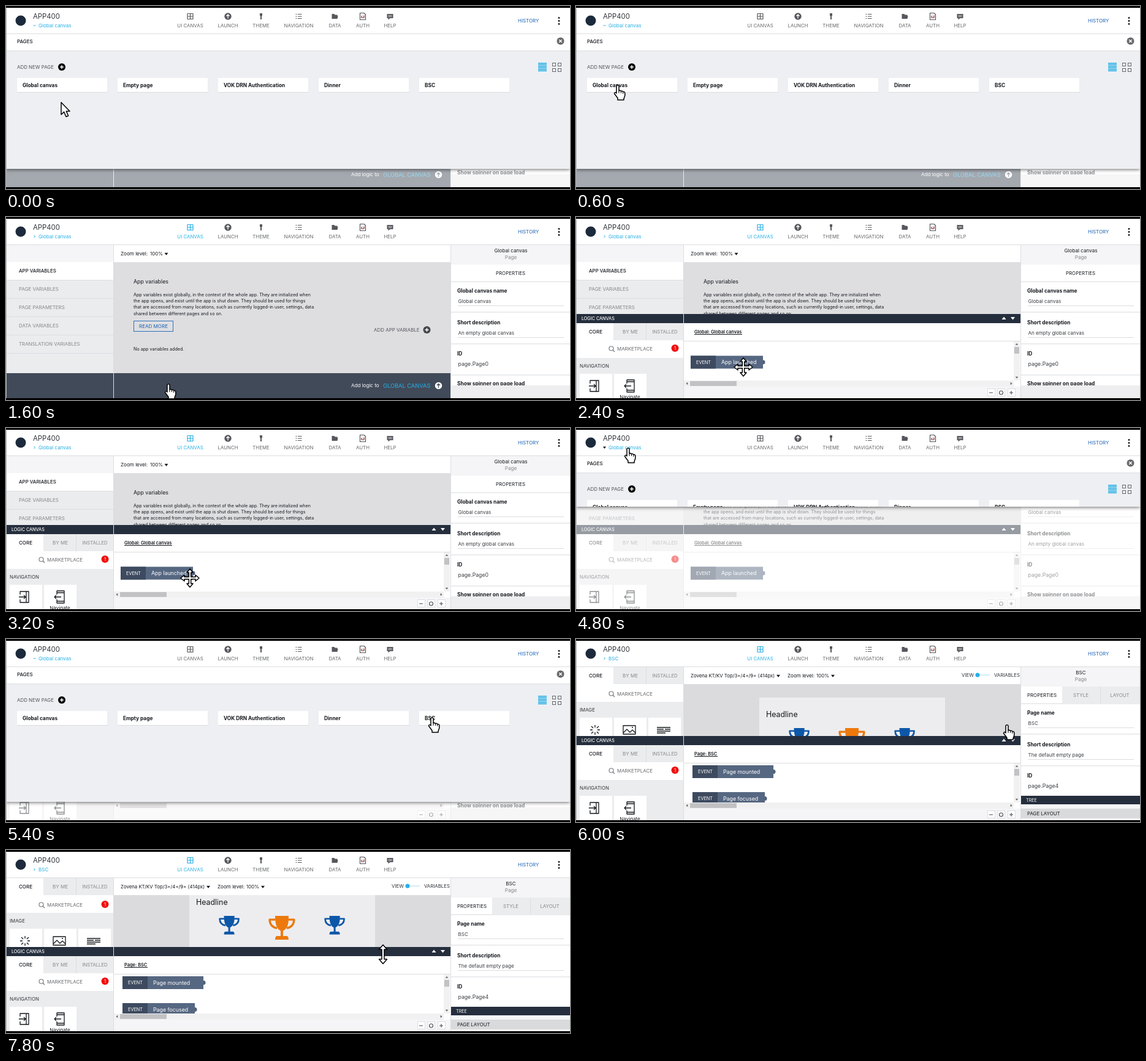
Animation of 920x300 px, one loop 8000 ms. Source, as an HTML page with a canvas:

```html
<!DOCTYPE html>
<html lang="en">
<head>
<meta charset="utf-8">
<title>App builder</title>
<style>
html, body { margin: 0; width: 100%; height: 100%; overflow: hidden; background: #fff; }
canvas { display: block; }
</style>
</head>
<body>
<canvas id="stage" width="920" height="300"></canvas>
<script>
const ctx = document.getElementById('stage').getContext('2d');
const LOOP = 8000, STEP = 200;
const INK = '#15181d', GRAY = '#85878b', ICON = '#55575c', SKY = '#27b0e6', BLUE = '#1b62b5',
      NAVY = '#252e3d', SLATE = '#414a59', PALE = '#ebecee', LINE = '#dcdde0', LIGHT = '#f5f5f7';

// Pointer steps: time, shape, hot spot
const POINTER = [
  [0, 'arrow', 90, 158], [200, 'arrow', 78, 143], [400, 'hand', 68, 130], [1000, 'arrow', 120, 185],
  [1200, 'arrow', 205, 245], [1400, 'hand', 256, 270], [1600, 'hand', 265, 274], [2200, 'hand', 268, 260],
  [2400, 'move', 273, 246], [2800, 'move', 288, 248], [3200, 'move', 300, 246], [3600, 'move', 286, 236],
  [3800, 'arrow', 250, 160], [4000, 'arrow', 200, 80], [4200, 'arrow', 160, 29], [4400, 'hand', 96, 34],
  [4600, 'hand', 85, 33], [5000, 'arrow', 290, 70], [5200, 'arrow', 560, 118], [5400, 'hand', 695, 129],
  [5800, 'hand', 702, 138], [6000, 'hand', 703, 141], [6200, 'arrow', 660, 120], [6400, 'arrow', 610, 112],
  [7000, 'arrow', 598, 135], [7200, 'arrow', 591, 157], [7400, 'resize', 598, 171], [7800, 'resize', 615, 171]
];

const clamp = v => Math.max(0, Math.min(1, v));
const ease = (t, start, length) => { const p = clamp((t - start) / length); return p * p * (3 - 2 * p); };

function box(x, y, w, h, fill, stroke) {
  if (fill) { ctx.fillStyle = fill; ctx.fillRect(x, y, w, h); }
  if (stroke) { ctx.strokeStyle = stroke; ctx.lineWidth = 1; ctx.strokeRect(x + .5, y + .5, w - 1, h - 1); }
}

// y is the middle of the capital letters
function text(str, x, y, size = 7.9, color = INK, weight = 400, align = 'left') {
  ctx.font = `${weight} ${size}px Inter, sans-serif`;
  ctx.textAlign = align;
  ctx.fillStyle = color;
  ctx.fillText(str, x, y + size * .364);
}

function shape(d, x, y, { fill, stroke, width = 1, scale = 1, turn = 0 }) {
  const path = new Path2D(d);
  ctx.save();
  ctx.translate(x, y);
  ctx.rotate(turn * Math.PI / 2);
  ctx.scale(scale, scale);
  ctx.lineWidth = width;
  ctx.lineJoin = 'round';
  if (fill) { ctx.fillStyle = fill; ctx.fill(path); }
  if (stroke) { ctx.strokeStyle = stroke; ctx.stroke(path); }
  ctx.restore();
}

function disc(x, y, r, fill) {
  ctx.fillStyle = fill;
  ctx.beginPath();
  ctx.arc(x, y, r, 0, 7);
  ctx.fill();
}

const triangle = (x, y, turn, fill = INK, scale = 1) => shape('M-3.5 -2H3.5L0 2.5Z', x, y, { fill, turn, scale });

function clipped(x, y, w, h, draw) {
  ctx.save();
  ctx.beginPath();
  ctx.rect(x, y, w, h);
  ctx.clip();
  draw();
  ctx.restore();
}

function plusDisc(x, y, fill) {
  disc(x, y, 6, fill);
  shape('M-3 0H3M0 -3V3', x, y, { stroke: '#fff', width: 1.5 });
}

function upDisc(x, y, fill, arrow) {
  disc(x, y, 5.7, fill);
  shape('M0 3.5V-3M-2.6 -.5L0 -3L2.6 -.5', x, y, { stroke: arrow, width: 1.3 });
}

const MENU = [
  ['UI CANVAS', 300.5, 'M-4.5 -4.5H4.5V4.5H-4.5ZM0 -4.5V4.5M-4.5 0H4.5'],
  ['LAUNCH', 362, null],
  ['THEME', 416, 'M-2 -5H2V-1H1V5H-1V-1H-2Z'],
  ['NAVIGATION', 477.5, 'M-5 -3.5H-3M-1.5 -3.5H5M-5 0H-3M-1.5 0H5M-5 3.5H-3M-1.5 3.5H5'],
  ['DATA', 536.5, 'M-5 -4H-1L0 -2.5H4V-1H5L4 4H-5Z'],
  ['AUTH', 582, 'M-4.5 -5.5H2L4.5 -3V5.5H-4.5ZM-1 -1L-2.5 1L-1 3M1 -1L2.5 1L1 3'],
  ['HELP', 626.5, 'M-5 -4H5V3H0L-3 5.5V3H-5Z']
];

function header(t, page, panelOpen) {
  box(0, 4, 920, 41, '#fff');
  box(0, 45, 920, 1, LINE);
  disc(24, 24, 8.5, '#1c2a3b');
  text('APP400', 44, 17, 11.3, '#33363b');
  const hover = t >= 3800 && t < 5200, caretTurn = panelOpen ? 0 : -1;
  if (hover) triangle(46.5, 32, caretTurn, INK, .75);
  else shape('M-2 -1L0 1L2 -1', 46.5, 32, { stroke: SKY, turn: caretTurn });
  text(page, 53, 32, 8.06, SKY);
  for (const [label, x, icon] of MENU) {
    const active = label === 'UI CANVAS' && !panelOpen, color = active ? SKY : ICON;
    text(label, x, 32.5, 7.85, active ? SKY : '#66686c', 400, 'center');
    if (!icon) upDisc(x, 17, ICON, '#fff');
    else if (['THEME', 'DATA', 'HELP'].includes(label)) shape(icon, x, 17, { fill: color });
    else shape(icon, x, 17, { stroke: color, width: 1.2 });
  }
  shape('M-2 0L0 3L3 -2', 582, 17, { stroke: '#d65a55' });
  shape('M-3 -1.5H3M-3 .5H3', 626.5, 17, { stroke: '#fff', width: .7 });
  text('HISTORY', 835, 24.5, 7.95, BLUE);
  for (const y of [19.5, 24.5, 29.5]) disc(902, y, 1.4, INK);
}

// Component library: tabs, search and the first tiles of a section
function library(y, search, section, badge, icons) {
  box(0, y - 14, 175, 120, '#fff');
  box(61, y - 14, 114, 28, PALE);
  box(114, y - 14, 1, 28, LINE);
  text('CORE', 32, y, 8, INK, 500, 'center');
  text('BY ME', 88.5, y, 8, GRAY, 400, 'center');
  text('INSTALLED', 145, y, 7.7, GRAY, 400, 'center');
  shape('M3 0A3.5 3.5 0 1 1 -4 0A3.5 3.5 0 1 1 3 0M2 2.5L5 5.5', 58, y + search - .5, { stroke: '#77797d', width: 1.2 });
  text('MARKETPLACE', 67, y + search, 7.9, '#66686c');
  if (badge) {
    disc(161.5, y + search - 1, 6, '#f20d0d');
    text('1', 161.5, y + search - 1, 7.5, '#fff', 400, 'center');
  }
  box(0, y + 43, 175, 80, PALE);
  text(section, 6, y + 56.5, 7.85, '#303338');
  icons.forEach((d, i) => {
    const x = 6 + i * 56;
    box(x, y + 69, 53, 60, '#fff');
    shape(d, x + 25, y + 89, { stroke: INK, width: 1.3 });
  });
}

const DOOR = 'M-8 -4V-9H6V9H-8V4M-10 0H1M-2 -3L1 0L-2 3M2 -9V9';
const PHONE = 'M-4 -4V-10H8V10H-4V4M-4 -7H8M-4 7H8M-8 0H3M-5 -3L-8 0L-5 3';
const SPINNER = 'M0 -8V-4M0 4V8M-8 0H-4M4 0H8M-6 -6L-3 -3M3 3L6 6M-6 6L-3 3M3 -3L6 -6';
const PICTURE = 'M-10 -7H10V7H-10ZM-10 5L-4 -1L1 4L5 0L10 5M4 -4H6';
const PARAGRAPH = 'M-11 -4H11M-11 -1H0M2 -1H11M-11 2H11M-11 5H3';

function field(label, value, y, underline = true, valueSize = 8.07) {
  text(label, 736, y, 8.3, INK, 700);
  text(value, 737.5, y + 17.5, valueSize, '#3b3e43');
  if (underline) box(737, y + 24, 173, 1, LINE);
}

function properties(bsc) {
  box(725, 46, 195, 251, '#fff');
  box(726, 46, 194, 32, LIGHT);
  text(bsc ? 'BSC' : 'Global canvas', 823.5, 55.5, 8.1, INK, 400, 'center');
  text('Page', 823.5, 66.5, 8.2, GRAY, 400, 'center');
  if (bsc) {
    box(793, 78, 127, 28, PALE);
    box(855, 78, 1, 28, LINE);
    text('STYLE', 823.5, 92, 7.9, GRAY, 400, 'center');
    text('LAYOUT', 887, 92, 7.9, GRAY, 400, 'center');
  }
  text('PROPERTIES', bsc ? 760 : 823, 92, 7.9, INK, 400, 'center');
  for (const y of [105, 155, 207, 258]) box(726, y, 194, 2, PALE);
  field(bsc ? 'Page name' : 'Global canvas name', bsc ? 'BSC' : 'Global canvas', 121);
  field('Short description', bsc ? 'The default empty page' : 'An empty global canvas', 173);
  field('ID', bsc ? 'page.Page4' : 'page.Page0', 223.5, false, 8.7);
  if (bsc) {
    box(726, 257, 194, 14, NAVY);
    text('TREE', 734, 264.5, 7.2, '#fff');
    box(726, 271, 194, 26, LIGHT);
    box(726, 278, 194, 16, '#d9dadc');
    text('PAGE LAYOUT', 736, 286, 7.85);
  } else {
    clipped(726, 260, 194, 16, () => text('Show spinner on page load', 736, 272.5, 8.4, INK, 700));
    box(726, 276, 194, 21, '#eeeef0');
  }
  box(725, 46, 1, 251, LINE);
}

function variablesView() {
  box(0, 46, 175, 251, PALE);
  box(0, 46, 175, 28, LIGHT);
  box(0, 74, 175, 29, '#fff');
  ['APP', 'PAGE', 'PAGE PARAMETERS', 'DATA', 'TRANSLATION'].forEach((name, i) => {
    const label = name.includes(' ') ? name : name + ' VARIABLES';
    text(label, 21, 88 + i * 30, 7.9, i ? GRAY : INK, i ? 400 : 500);
    box(0, 103 + i * 30, 175, 1, LINE);
  });
  box(176, 74, 549, 223, '#dedee1');
  text('Zoom level:', 187, 60, 8.1);
  text('100%', 235, 60, 7.9);
  triangle(261.5, 60.5, 0, INK, .85);
  text('App variables', 208, 105.5, 8.8);
  [
    'App variables exist globally, in the context of the whole app. They are initialized when',
    'the app opens, and exist until the app is shut down. They should be used for things',
    'that are accessed from many locations, such as currently logged-in user, settings, data',
    'shared between different pages and so on.'
  ].forEach((line, i) => text(line, 208, 127 + i * 10.4, 7.16));
  box(208, 170, 65, 18, null, '#2f70b8');
  text('READ MORE', 240.5, 179, 8.05, BLUE, 400, 'center');
  text('ADD APP VARIABLE', 600, 185, 7.95, '#55575c');
  plusDisc(686.5, 185, '#44464b');
  text('No app variables added.', 208, 216.5, 7.17);
  box(0, 256, 725, 41, SLATE);
  text('Add logic to', 563, 276.5, 8.05, '#fff');
  text('GLOBAL CANVAS', 615, 276.5, 9.27, SKY);
  upDisc(705.5, 276.5, '#fff', SLATE);
}

function trophy(x, y, scale, color) {
  shape('M9 0H27V4C27 13 24 18 19.6 20V27H25Q27 28 27 32H9Q9 28 11 27H16.4V20C12 18 9 13 9 0Z', x, y, { fill: color, scale });
  shape('M9.5 5H1.7C1.7 11 5 15.5 11.5 16.5M26.5 5H34.3C34.3 11 31 15.5 24.5 16.5', x, y, { stroke: color, scale, width: 2.8 });
}

function pageView(scroll, badge) {
  library(60, 30, 'IMAGE', badge, [SPINNER, PICTURE, PARAGRAPH]);
  box(176, 74, 549, 90, '#dbdbde');
  text('Zovena KT/KV Top/3+/4+/9+ (414px)', 187, 60, 7.8);
  triangle(330, 60.5, 0, INK, .85);
  text('Zoom level:', 345, 60, 8.1);
  text('100%', 392, 60, 7.9);
  triangle(419, 60.5, 0, INK, .85);
  text('VIEW', 629, 59, 7.8, '#303338');
  box(655, 58.5, 20, 1, '#a9d9ef');
  disc(655, 59, 3.5, SKY);
  text('VARIABLES', 682, 59, 7.8, '#303338');
  clipped(176, 74, 549, 90, () => {
    box(299, 96 - scroll, 303, 150, '#ededf0');
    text('Headline', 310, 123 - scroll, 12.4);
    trophy(347, 146 - scroll, .95, '#0c57a8');
    trophy(428, 146 - scroll, 1.22, '#ed790d');
    trophy(519, 146 - scroll, .95, '#0c57a8');
  });
}

function eventBlock(label, x, y, width) {
  disc(x + width, y, 3.5, '#4f6079');
  box(x, y - 10.5, width, 21, '#566781');
  box(x, y - 10.5, 41, 21, '#3d4a5f');
  text('EVENT', x + 21, y, 7.3, '#fff', 400, 'center');
  text(label, x + 50, y, 8.8, '#fff');
}

function logicCanvas(top, bsc) {
  ctx.save();
  ctx.translate(0, top - 159);
  box(0, 159, 725, 138, '#fff');
  library(188, 28, 'NAVIGATION', true, [DOOR, PHONE]);
  text('Navigate', 88, 295, 8, INK, 400, 'center');
  box(0, 159, 725, 15, NAVY);
  text('LOGIC CANVAS', 9, 166.5, 7.2, '#fff', 500);
  triangle(698, 166, 2, '#fff');
  triangle(712.5, 166, 0, '#fff');
  box(175, 174, 1, 123, LINE);
  box(176, 203, 549, 1, LINE);
  text(bsc ? 'Page: BSC' : 'Global: Global canvas', 193, 188, 7.4, INK, 600);
  box(193, 192, bsc ? 38 : 78, 1, INK);
  clipped(176, 204, 538, 64, () => {
    if (bsc) {
      eventBlock('Page mounted', 190, 217.5, 132);
      eventBlock('Page focused', 190, 261.5, 118);
    } else eventBlock('App launched', 187, 238, 118);
  });
  box(714, 204, 10, 64, '#f1f1f2');
  box(715, 213, 8, 11, '#c2c2c4');
  triangle(719, 208.5, 2, '#666', .65);
  triangle(719, 263, 0, '#666', .65);
  box(176, 268, 538, 10, '#f1f1f2');
  box(186, 269, 76, 8, '#c2c2c4');
  triangle(181, 273, 1, '#666', .65);
  triangle(710, 273, -1, '#666', .65);
  box(176, 278, 549, 19, LIGHT);
  for (const x of [671, 687, 704]) box(x, 281, 13, 13, '#fff', LINE);
  shape('M674 288H680M707 288H713M710 285V291M696.5 288A3 3 0 1 1 690.5 288A3 3 0 1 1 696.5 288', 0, 0, { stroke: '#44474c', width: 1.1 });
  ctx.restore();
}

function pagesPanel(height) {
  ctx.fillStyle = `rgba(255,255,255,${.52 * clamp(height / 80)})`;
  ctx.fillRect(0, 46, 920, 251);
  ctx.save();
  ctx.shadowColor = 'rgba(0,0,0,.6)';
  ctx.shadowBlur = 6;
  ctx.shadowOffsetY = 1;
  box(0, 45, 920, height, '#eeeff2');
  ctx.restore();
  clipped(0, 45, 920, height, () => {
    box(0, 45, 920, 28, '#fff');
    box(0, 73, 920, 1, LINE);
    text('PAGES', 18, 58.5, 7.9, INK, 500);
    disc(904.5, 57.5, 6, '#68696d');
    shape('M-2.3 -2.3L2.3 2.3M2.3 -2.3L-2.3 2.3', 904.5, 57.5, { stroke: '#fff', width: 1.3 });
    text('ADD NEW PAGE', 18, 100, 7.9, '#505358');
    plusDisc(91, 100, '#000');
    for (let y = 93; y < 108; y += 2.5) box(868, y, 14, 1.6, SKY);
    for (const x of [891, 900]) for (const y of [93, 102]) box(x, y, 6, 6, null, '#66686c');
    ['Global canvas', 'Empty page', 'VOK DRN Authentication', 'Dinner', 'BSC'].forEach((name, i) => {
      const x = 18 + i * 164;
      box(x, 118, 148, 24, '#dcdde0');
      box(x, 118, 147.5, 23, '#fff');
      text(name, x + 9, 129.5, 8.3, INK, 700);
    });
  });
}

const POINTER_PATHS = {
  arrow: 'M0 0V20L4.6 15.6L8 23.5L11.6 22L8.3 14.4H14Z',
  hand: 'M-2 1Q0 -1.5 2 1V9Q4 7.5 5.5 9.5Q7.5 8.5 8.7 10.7Q11 10 11.8 12.5V17L10 22V24H0V21L-5.5 13.5Q-5 10 -2 13Z',
  move: 'M0 -15L5 -9H1.7V-1.7H9V-5L15 0L9 5V1.7H1.7V9H5L0 15L-5 9H-1.7V1.7H-9V5L-15 0L-9 -5V-1.7H-1.7V-9H-5Z',
  resize: 'M0 -15.5L6.5 -8H2V8H6.5L0 15.5L-6.5 8H-2V-8H-6.5Z'
};

function pointer(t) {
  const [, kind, x, y] = POINTER.findLast(step => step[0] <= t);
  shape(POINTER_PATHS[kind], x, y, { fill: '#fff', stroke: '#000', width: 1.5 });
  if (kind === 'hand') shape('M2 9V13M5.5 10V13M8.7 11V14', x, y, { stroke: '#000' });
}

function draw(t) {
  const bsc = t >= 5600;
  const openness = t < 3000 ? 1 - ease(t, 600, 480) : ease(t, 4600, 480) - ease(t, 5520, 440);
  const height = Math.round(222 * openness);
  box(0, 0, 920, 300, '#000');
  clipped(0, 3, 920, 294, () => {
    box(0, 3, 920, 294, '#fff');
    if (bsc) pageView(38 * ease(t, 6300, 600), t >= 6200);
    else variablesView();
    const rise = ease(t, 1800, 400);
    if (rise > 0) logicCanvas(256 - 97 * rise, bsc);
    box(175, 46, 1, 251, LINE);
    properties(bsc);
    if (height > 0) pagesPanel(height);
    header(t, bsc ? 'BSC' : 'Global canvas', height > 0);
    box(0, 4, 1, 293, '#b5b6b9');
  });
  pointer(t);
}

const start = performance.now();
function tick() {
  const t = (performance.now() - start) % LOOP;
  draw(Math.floor(t / STEP) * STEP);
  requestAnimationFrame(tick);
}
tick();
</script>
</body>
</html>
```
